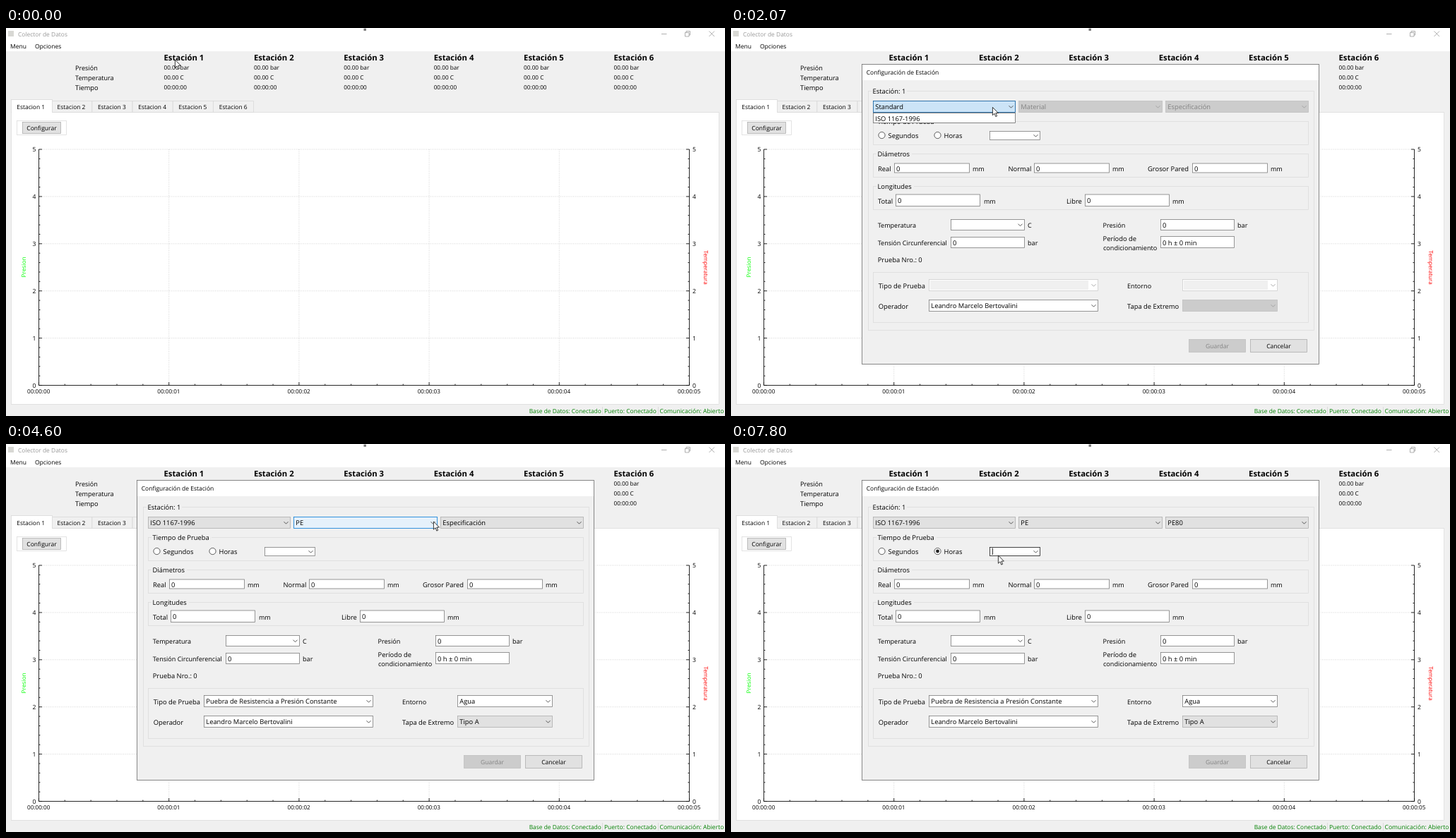
Animation, 1018 px wide and 550 px high, one loop 8 s. Source, as an HTML page:

```html
<!DOCTYPE html>
<html lang="es">
<head>
<meta charset="utf-8">
<title>Colector de Datos</title>
<style>
  html, body { margin: 0; width: 100%; height: 100%; overflow: hidden; background: #f0f0f0; }
  svg { display: block; width: 100vw; height: 100vh; stroke-width: .78; }
  text { font-family: "Open Sans", "Noto Sans", sans-serif; text-rendering: geometricPrecision; white-space: pre; }
</style>
</head>
<body>
<svg id="stage" viewBox="0 0 1018 550">
  <g id="main"></g>
  <g id="live"></g>
  <g id="dialog"><g id="form"></g><g id="fields"></g></g>
  <path id="cursor" d="M.4 .4V11.7L3 9.3l1.8 4.3 1.8-.8L4.8 8.6H8.4Z" fill="#fff" stroke="#000"/>
</svg>
<script>
const LOOP = 8000, FPS = 15;
const $ = id => document.getElementById(id);
const LINE = '#dcdcdc', FACE = '#e1e1e1', EDGE = '#adadad', FIELD = '#7a7a7a';
const HOT = ['#e5f1fb', '#0078d7'], DOWN = ['#cce4f7', '#005499'];

// ---- drawing helpers ----
const rect = (x, y, w, h, fill, stroke = 'none') => {
  const o = stroke === 'none' ? 0 : .5;
  return `<rect x="${x + o}" y="${y + o}" width="${w - 2 * o}" height="${h - 2 * o}" fill="${fill}" stroke="${stroke}"/>`;
};
const path = (d, stroke, extra = '') => `<path d="${d}" fill="none" stroke="${stroke}" ${extra}/>`;
const text = (x, y, s, size = 9.4, fill = '#000', extra = '') =>
  `<text x="${x}" y="${y}" font-size="${size}" fill="${fill}" ${extra}>${s}</text>`;
const mid = 'text-anchor="middle"';
const chevron = (x, y, color = '#444') => path(`M${x - 3} ${y - 1.5}l3 3l3 -3`, color, 'stroke-width=".9"');
const button = (x, y, w, h, label, [fill, edge] = [FACE, EDGE], color = '#000') =>
  rect(x, y, w, h, fill, edge) + text(x + w / 2, y + h / 2 + 3.4, label, 8.55, color, mid);
const input = (x, y, w, h, s = '0') =>
  rect(x, y, w, h, '#fff', FIELD) + text(x + 3, y + h / 2 + 4.1, s);
const combo = (x, y, w, h, s, fill = '#fff', edge = FIELD, color = '#000') =>
  rect(x, y, w, h, fill, edge) + text(x + 3.3, y + h / 2 + 3.7, s, 9.35, color) +
  chevron(x + w - 6.5, y + h / 2 + .2, color === '#000' ? '#444' : '#a0a0a0');
const group = (x, y, w, h, title, tw) =>
  rect(x, y, w, h, 'none', LINE) +
  (title ? rect(x + 5, y - 1, tw, 3, '#f0f0f0') + text(x + 6.5, y + 3.7, title) : '');

// ---- main window ----
function mainWindow() {
  let s = rect(0, 0, 1018, 550, '#f0f0f0') + rect(0, 0, 1018, 33, '#fff');
  s += rect(3, 4, 8, 8, '#d8d8d4') + rect(506.5, .7, 3.4, 3.2, '#777');
  s += text(6, 29, 'Menu', 8.5) + text(41, 29, 'Opciones', 8.5);

  s += text(98, 60, 'Presión', 9.1) + text(98, 74, 'Temperatura', 9.1) + text(98, 88, 'Tiempo', 9.3);
  for (let i = 0; i < 6; i++) {
    const x = 223.5 + i * 127.4;
    s += text(x, 45.7, 'Estación ' + (i + 1), 11.3, '#000', 'font-weight="700"');
    ['00.00 bar', '00.00 C', '00:00:00'].forEach((v, j) => s += text(x, 59.4 + j * 13.7, v, 8.2));
  }

  s += rect(7, 119, 1003, 415, '#fff', LINE);
  for (let i = 1; i < 6; i++) s += rect(7 + i * 57.2, 103, 58, 17, '#f0f0f0', '#d9d9d9');
  s += rect(7, 101, 59, 19, '#fff', '#d9d9d9') + rect(8, 118, 57, 3, '#fff');
  for (let i = 0; i < 6; i++) s += text(15.3 + i * 57.3, 114.6, 'Estacion ' + (i + 1), 8.45);
  s += rect(15, 131, 71, 21, '#fff', LINE);

  // chart
  const L = 46.5, R = 967.5, T = 172, B = 506.5, dx = (R - L) / 5, dy = (B - T) / 5;
  let grid = '', axes = `M${L} ${T}V${B}H${R}V${T}`;
  for (let i = 0; i <= 25; i++) {
    const big = i % 5 === 0, n = big ? 4.5 : 2, x = L + i * dx / 5, y = B - i * dy / 5;
    axes += `M${L} ${y}h${n}M${R} ${y}h${-n}M${x} ${B}v${-n}`;
    if (!big) continue;
    const v = i / 5;
    if (v) grid += `M${L} ${y}H${R}`;
    if (v && v < 5) grid += `M${x} ${T}V${B}`;
    s += text(42.5, y + 3.2, v, 8.6, '#000', 'text-anchor="end"') + text(972, y + 3.2, v, 8.6);
    s += text(x - .3, 518, '00:00:0' + v, 8.15, '#000', mid);
  }
  s += path(grid, '#c8c8c8', 'stroke-dasharray="1 1.6"') + path(axes, '#000', 'stroke-width=".85"');
  s += text(0, 0, 'Presion', 8.3, '#0f0', mid + ' transform="translate(28.3 339) rotate(-90)"');
  s += text(0, 0, 'Temperatura', 8.05, '#f00', mid + ' transform="translate(988 339.5) rotate(90)"');

  // status bar
  const green = '#008000';
  s += text(740.7, 546.3, 'Base de Datos: Conectado', 8.38, green) + text(847, 546.3, 'Puerto: Conectado', 8.5, green);
  return s + text(925.5, 546.3, 'Comunicación: Abierto', 8.6, green) + path('M844.5 537v11M923.5 537v11', '#d5d5d5');
}

// ---- parts of the main window that react ----
function liveParts(k, at) {
  const ink = k === 12 || k === 13 ? '#000' : '#999';
  const state = k === 12 ? DOWN : k < 14 && inside(at, 23, 134, 54, 16) ? HOT : [FACE, EDGE];
  return text(17, 12, 'Colector de Datos', 8.43, ink) +
    path('M928 8.5h7.5M961.5 6.5h5.5v5.5h-5.5zM963 6.5v-2h5.5v5.5h-1.5M995.5 4.5l7.5 7.5m0 -7.5l-7.5 7.5', ink) +
    button(23, 133, 55, 17, 'Configurar', state);
}

// ---- dialog: fixed parts ----
function formParts() {
  let s = rect(185, 51, 648, 426, '#f0f0f0', '#6a6a6a') + rect(186, 52, 646, 22, '#fff');
  s += text(191.7, 65.8, 'Configuración de Estación', 8.5);
  s += group(194, 89, 632, 340, 'Estación: 1', 50);
  s += group(201, 132, 617, 34, 'Tiempo de Prueba', 85);
  s += group(201, 178, 617, 34, 'Diámetros', 50);
  s += group(201, 224, 617, 34, 'Longitudes', 53);
  s += group(201, 346, 617, 72);
  const labels = [
    [222.5, 156.2, 'Segundos'], [301.5, 156.2, 'Horas'],
    [208, 203, 'Real'], [342, 203, 'mm', 9], [392.5, 203, 'Normal'], [540, 203, 'mm', 9],
    [590, 203, 'Grosor Pared'], [764, 203, 'mm', 9],
    [208, 249, 'Total'], [358, 249, 'mm', 9], [475, 249, 'Libre'], [625, 249, 'mm', 9],
    [207.7, 283.3, 'Temperatura', 9.05], [420, 283.3, 'C', 9], [526.5, 283.3, 'Presión', 9.1], [717, 283.3, 'bar', 9.1],
    [207.7, 308.2, 'Tensión Circunferencial', 9.05], [420, 308.2, 'bar', 9.1],
    [526.5, 301.7, 'Período de'], [527, 314.5, 'condicionamiento', 9.1], [207.7, 332, 'Prueba Nro.: 0'],
    [208.7, 368.7, 'Tipo de Prueba'], [208.7, 397.5, 'Operador'],
    [561, 368.7, 'Entorno', 9.1], [561, 397.5, 'Tapa de Extremo']
  ];
  s += labels.map(l => text(...l)).join('');
  s += [231, 429, 653].map(x => input(x, 191.5, 107, 14)).join('');
  s += [233, 501].map(x => input(x, 235.5, 120, 17.5)).join('');
  s += combo(311, 271, 105, 16, '') + input(608, 271, 105, 16);
  s += input(311, 296, 105, 16) + input(608, 295, 105, 17, '0 h ± 0 min');
  s += combo(280, 385, 240, 17, 'Leandro Marcelo Bertovalini');
  return s + button(648, 441, 81, 19, 'Guardar', ['#ccc', '#bfbfbf'], '#838383') + button(735, 441, 81, 19, 'Cancelar');
}

// ---- dialog: fields that change; times are in steps of 1/15 s ----
const pickers = [
  { x: 201, w: 202, hint: 'Standard', items: ['ISO 1167-1996'], on: 0, press: 31, open: 31, pick: 44 },
  { x: 407, w: 204, hint: 'Material', items: ['PE'], on: 44, press: 52, open: 53, pick: 65 },
  { x: 615, w: 203, hint: 'Especificación', items: ['PE80', 'PE100'], on: 65, press: 75, open: 76, pick: 90 }
];

function picker(p, k, at) {
  const label = k >= p.pick ? p.items[0] : p.hint;
  if (k < p.on) return combo(p.x, 103, p.w, 17, label, '#ccc', '#bfbfbf', '#838383');
  const down = k >= p.press && k < p.pick;
  return combo(p.x, 103, p.w, 17, label, ...(down ? DOWN : inside(at, p.x, 103, p.w, 17) ? HOT : [FACE, EDGE]));
}

function list(p, k, at) {
  if (k < p.open || k >= p.pick) return '';
  let s = rect(p.x, 120, p.w, p.items.length * 14 + 1, '#fff', '#646464');
  p.items.forEach((item, i) => {
    const y = 121 + i * 14;
    if (inside(at, p.x, y, p.w, 13)) s += rect(p.x + 1, y, p.w - 2, 13, '#cde8ff', '#99d1ff');
    s += text(p.x + 3.3, y + 10.6, item, 9.35);
  });
  return s;
}

function radio(x, at, checked, down) {
  const hot = inside(at, x - 5, 147, 10, 10);
  return `<circle cx="${x}" cy="152" r="4.6" fill="${down ? DOWN[0] : '#fff'}" stroke="${hot ? HOT[1] : '#333'}"/>` +
    (checked ? `<circle cx="${x}" cy="152" r="2.4" fill="${hot ? HOT[1] : '#222'}"/>` : '');
}

function fieldParts(k, at) {
  let s = pickers.map(p => picker(p, k, at)).join('');
  s += radio(213.5, at, false, false) + radio(292.5, at, k >= 107, k === 105 || k === 106);
  s += combo(366, 146, 72, 13, '', '#fff', inside(at, 366, 146, 72, 13) && k > 107 ? '#111' : FIELD);
  if (k >= 117) s += rect(370, 147.5, .8, 9.5, '#000');
  if (k < 44) {
    s += combo(280, 356, 240, 17, '', '#fff', '#ccc', '#888') + rect(282, 358, 224, 13, '#f0f0f0');
    s += combo(639, 356, 135, 17, '', '#fff', '#ccc', '#888') + rect(641, 358, 119, 13, '#f0f0f0');
    s += combo(639, 385, 135, 17, '', '#ccc', '#bfbfbf', '#838383');
  } else {
    s += combo(280, 356, 240, 17, 'Puebra de Resistencia a Presión Constante');
    s += combo(639, 356, 135, 17, 'Agua') + combo(639, 385, 135, 17, 'Tipo A', FACE, EDGE);
  }
  return s + pickers.map(p => list(p, k, at)).join('');
}

// ---- pointer path: step, x, y ----
const route = [
  [0, 239, 44.7], [8, 59, 145], [16, 59, 145], [22, 366, 129], [24, 366, 129], [27, 370, 112],
  [34, 370, 112], [38, 373, 129], [45, 373, 129], [48, 520, 116], [55, 520, 116], [59, 523, 130],
  [66, 523, 130], [69, 605, 109.5], [71, 640, 108], [79, 640, 108], [84, 630, 127], [91, 630, 127],
  [95, 359, 142], [97, 359, 142], [100, 291, 152], [108, 291, 152], [113, 378, 157.5], [120, 378, 157.5]
];

function pointer(k) {
  const i = Math.max(1, route.findIndex(r => r[0] >= k));
  const [a, ax, ay] = route[i - 1], [b, bx, by] = route[i];
  const u = (k - a) / (b - a), e = u * u * (3 - 2 * u);
  return [ax + (bx - ax) * e, ay + (by - ay) * e];
}

function inside([px, py], x, y, w, h) {
  return px >= x && px <= x + w && py >= y && py <= y + h;
}

// ---- playback ----
$('main').innerHTML = mainWindow();
$('form').innerHTML = formParts();
let shown = -1;

function draw(k) {
  const at = pointer(k), dialog = $('dialog');
  $('live').innerHTML = liveParts(k, at);
  $('fields').innerHTML = fieldParts(k, at);
  dialog.setAttribute('visibility', k < 14 ? 'hidden' : 'visible');
  dialog.setAttribute('opacity', k === 14 ? .6 : 1);
  dialog.setAttribute('transform', k === 14 ? 'translate(509 264) scale(.97) translate(-509 -264)' : '');
  $('cursor').setAttribute('transform', `translate(${at[0]} ${at[1]})`);
}

const start = performance.now();
function tick() {
  const t = (performance.now() - start) % LOOP;
  const k = Math.min(119, Math.floor(t * FPS / 1000 + .06));
  if (k !== shown) draw(shown = k);
  requestAnimationFrame(tick);
}
tick();
</script>
</body>
</html>
```
